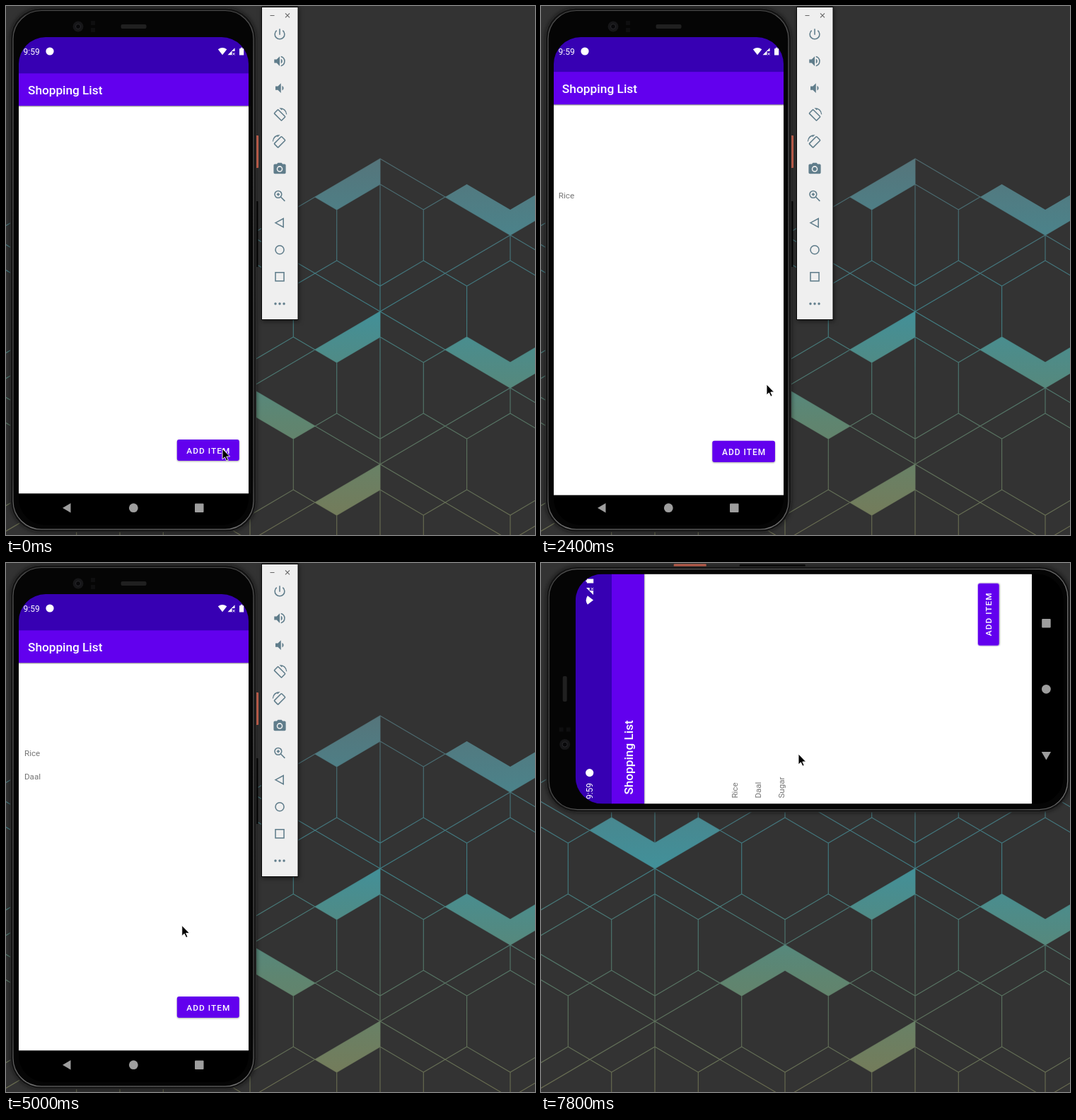
An HTML page for the animation above (8000 ms loop, 748x748 px).

```html
<!DOCTYPE html>
<html lang="en">
<head>
<meta charset="utf-8">
<title>Shopping list</title>
<style>
  html, body { margin: 0; width: 100%; height: 100%; overflow: hidden; background: #333; }
  svg { display: block; width: 100%; height: 100%; }
  text { font-family: Roboto, sans-serif; }
  .title { font-size: 17.2px; font-weight: 500; fill: #fff; }
  .label { font-size: 11.8px; font-weight: 500; letter-spacing: 1.05px; fill: #fff; text-anchor: middle; }
  .entry { font-size: 11.6px; fill: #757575; }
  .button { filter: drop-shadow(0 1px 1px rgba(0, 0, 0, .35)); }
  .press { fill: #fff; opacity: 0; }
  .line { fill: none; stroke: #607d8b; stroke-width: 1.8; }
  .body { filter: drop-shadow(0 0 3px rgba(0, 0, 0, .6)); }
  .panel { filter: drop-shadow(1px 2px 3px rgba(0, 0, 0, .5)); }
</style>
</head>
<body>
<svg viewBox="0 0 748 748">
  <defs>
    <linearGradient id="tint" gradientUnits="userSpaceOnUse" x1="0" y1="216" x2="0" y2="748">
      <stop offset="0" stop-color="#55757b"/>
      <stop offset=".4" stop-color="#429099"/>
      <stop offset=".7" stop-color="#5f8570"/>
      <stop offset="1" stop-color="#787a56"/>
    </linearGradient>
    <linearGradient id="rim" x1="0" y1="0" x2="0" y2="1">
      <stop offset="0" stop-color="#4c4c4c"/>
      <stop offset=".1" stop-color="#5c5c5c"/>
      <stop offset=".9" stop-color="#4a4a4a"/>
      <stop offset="1" stop-color="#777"/>
    </linearGradient>
    <clipPath id="glass"><rect x="18" y="44" width="325" height="690" rx="38"/></clipPath>
    <g id="window">
      <rect x="18" y="44" width="325" height="690" fill="#000"/>
      <rect x="18" y="44" width="325" height="52" fill="#3700b3"/>
      <rect x="18" y="95.3" width="325" height="46" fill="#6200ee"/>
      <rect x="18" y="141.3" width="325" height="548" fill="#fff"/>
      <rect x="18" y="141.3" width="325" height="1.4" fill="#000" opacity=".22"/>
      <text class="title" x="31" y="125">Shopping List</text>
    </g>
  </defs>

  <rect width="748" height="748" fill="#333"/>
  <path id="mesh" fill="none" stroke="url(#tint)" stroke-width="1.1" opacity=".8"/>
  <path id="bands" fill="url(#tint)"/>

  <g id="phone">
    <rect x="353" y="183" width="4" height="46" rx="1" fill="#e2705a"/>
    <rect x="353" y="276" width="3.5" height="93" rx="1" fill="#0a0a0a"/>
    <rect class="body" x="6.500" y="3" width="347" height="740.500" rx="43" fill="#141414" stroke="#303030"/>
    <rect x="10" y="6.500" width="340" height="733.500" rx="40" fill="#050505" stroke="url(#rim)" stroke-width="1.200"/>
    <circle cx="102" cy="29" r="7.500" fill="#161618"/>
    <circle cx="102" cy="29" r="3.500" fill="#08080a" stroke="#29292c"/>
    <path d="M120 21h6v6h-6zM120 31h6v6h-6z" fill="#0e0e0f"/>
    <rect x="162.500" y="26" width="36" height="6" rx="2" fill="#202020"/>
    <g clip-path="url(#glass)">
      <rect x="18" y="44" width="325" height="690" fill="#000"/>
      <g id="main"><use href="#window"/></g>
      <g id="list"><use href="#window"/></g>
    </g>
    <g fill="#fff">
      <text x="24.500" y="68.800" font-size="12">9:59</text>
      <circle cx="62" cy="64" r="5.600"/>
      <path d="M299.800 61.200Q306 56.800 312.300 61.200L306 69.300ZM313.500 69.300L323.500 59.300V64H319.500V69.300ZM330 60.200h1.800v-1.400h2.600v1.400h1.800v9.300h-6.200z"/>
      <path d="M320.500 66l3 3.400m0-3.400l-3 3.400" stroke="#fff" stroke-width=".9"/>
    </g>
    <g fill="#9e9e9e">
      <path d="M80 709.700L91.500 703V716.400Z"/>
      <circle cx="180.300" cy="709.700" r="6.400"/>
      <rect x="267" y="703.500" width="12.500" height="12.500" rx="1"/>
    </g>
  </g>

  <g id="tools">
    <rect class="panel" x="361.500" y="1.500" width="51.500" height="442" fill="#efefef" stroke="#080808"/>
    <path d="M373.500 13.500h6M395 10.300l6 6m0-6l-6 6" stroke="#666" stroke-width="1.100"/>
  </g>

  <path id="cursor" d="M0 0V15L3.400 11.900 5.900 17.200 8.200 16.200 5.800 11H10.600Z" stroke="#fff" stroke-width=".9"/>
</svg>
<script>
const $ = id => document.getElementById(id);
const add = (id, markup) => $(id).insertAdjacentHTML('beforeend', markup);

// Wallpaper: a triangular lattice with a hexagon under each node
const U = 61.33, V = 36;
const trace = (x, y, points, end = '') =>
  'M' + points.map(([i, j]) => `${(x + i * U).toFixed(1)} ${y + j * V}`).join('L') + end;
const half = [[0, 0], [0, 1], [-1, 2], [-1.5, 1.5]];
const roof = [[1.5, 1.5], [1, 2], [0, 1], [-1, 2], [-1.5, 1.5], [0, 0]];
const valley = roof.map(([i, j]) => [i, -j]);
const bandOf = [valley, roof, half, valley];
const firstBand = [432, 540, 216, 324];
let mesh = '', bands = '';
for (let col = -2; col < 5; col++) {
  const odd = col & 1, x = 161 + col * 3 * U;
  for (let y = 216 + odd * 108; y < 800; y += 216) {
    const line = (...points) => { mesh += trace(x, y, points); };
    line([-3, 3], [0, 0], [3, 3]);
    if (odd) line([0, -1], [0, 1]);
    else line([0, 0], [0, 6]);
    mesh += trace(x, y, [[0, 1], [1, 2], [1, 4], [0, 5], [-1, 4], [-1, 2]], 'Z');
    for (const s of [-1, 1]) {
      line([s, 4], [2 * s, 5]);
      line([s, 2], [1.5 * s, 1.5]);
    }
    const single = col < 2;
    if (single ? y === firstBand[col] : y >= firstBand[col] && y < 700 && bandOf[col])
      bands += trace(x, y, bandOf[col], 'Z');
  }
}
$('mesh').setAttribute('d', mesh);
$('bands').setAttribute('d', bands);

// App screens
const button = (id, label, x, y, w) => `
  <g><rect class="button" x="${x}" y="${y}" width="${w}" height="30" rx="3" fill="#6200ee"/>
  <rect class="press" id="${id}" x="${x}" y="${y}" width="${w}" height="30" rx="3"/>
  <text class="label" x="${x + w / 2 + .5}" y="${y + 19.8}">${label}</text></g>`;
const goods = ['Rice', 'Daal', 'Sugar', 'Salt', 'Cooking Oil', 'Onion', 'Banana', 'Apple', 'Cheese', 'Coffee'];
goods.forEach((name, i) => add('list', button(name, name.toUpperCase(), 24.8, 222.2 + i * 39.67, 311)));
add('main', button('Add', 'ADD ITEM', 241.800, 613, 88));

// Emulator toolbar, each icon on a 24-unit grid
const rotate = `<rect class="line" x="7.500" y="3.500" width="9" height="17" rx="1" transform="rotate(-45 12 12)"/>
  <path d="M11.300 0L15.200 3.800 16.500 2.500Q22 5.200 22.500 11H24Q23 0 11.300 0Z"/>`;
const sound = '<path d="M3 9v6h4l5 5V4L7 9zM14 8v8q2.500-1.200 2.500-4T14 8z"/>';
const dot = x => `<circle cx="${x}" cy="12" r="2"/>`;
const icons = [
  '<path class="line" d="M12 3V13M7 5.800A8 8 0 1 0 17 5.800"/>',
  sound + '<path class="line" d="M14 4.300Q20 6 20 12T14 19.700"/>',
  `<g transform="translate(2)">${sound}</g>`,
  rotate,
  `<g transform="matrix(-1 0 0 1 24 0)">${rotate}</g>`,
  '<path d="M9 2L7.200 4H4Q2 4 2 6V18Q2 20 4 20H20Q22 20 22 18V6Q22 4 20 4H16.800L15 2z"/><circle cx="12" cy="12" r="4.100" stroke="#efefef" stroke-width="1.800"/>',
  '<g class="line"><circle cx="9.500" cy="9.500" r="5.700"/><path d="M13.700 13.700L20.500 20.500M7 9.500h5M9.500 7v5"/></g>',
  '<path class="line" d="M5 12L18 5V19Z"/>',
  '<circle class="line" cx="12" cy="12" r="7"/>',
  '<rect class="line" x="5" y="5" width="14" height="14"/>',
  dot(5) + dot(12) + dot(19)
];
icons.forEach((icon, i) =>
  add('tools', `<g fill="#607d8b" transform="translate(376.700 ${29.6 + i * 38.1}) scale(.86)">${icon}</g>`));

// Each visit to the list picks one item; times in ms
const visits = [
  { name: 'Rice', press: 1000, open: 1200, pick: 1800, close: 2000, settle: 3300, overshoot: .086 },
  { name: 'Daal', press: 3300, open: 3400, pick: 3900, close: 4300, settle: 4500, overshoot: .015 },
  { name: 'Sugar', press: 4800, open: 5200, pick: 5600, close: 6000, settle: 6100, overshoot: .012 }
];
visits.forEach(({ name }, i) =>
  add('main', `<text class="entry" id="entry${i}" x="26" y="${273 + i * 33}">${name}</text>`));
const ROTATE = 6700, TOOLS_GONE = 6800, CURSOR_BACK = 7000, LOOP = 8000;

// Cursor stops: arrival, departure, x, y
const ADD = [297, 624];
const stops = [
  [0, 400, 306, 626], [700, 700, 354, 731], [1000, 1300, ...ADD],
  [1800, 1900, 190, 234], [2400, 3200, 319, 535], [3300, 3600, ...ADD],
  [3800, 4000, 210, 276], [4300, 4900, ...ADD], [5400, 5700, 163, 314],
  [6100, 6100, 363, 187], [6500, 7100, 390, 152], [7300, 7400, 384, 161], [7800, LOOP, 364, 270]
];

const zoom = s => `translate(180.5 386) scale(${s}) translate(-180.5 -386)`;
const show = (el, on) => el.setAttribute('visibility', on ? 'visible' : 'hidden');
const easeOut = k => 1 - (1 - k) ** 2;

function cursorAt(t) {
  const i = stops.findLastIndex(s => s[0] <= t);
  const [, leave, x, y] = stops[i];
  if (t <= leave) return `translate(${x} ${y})`;
  const [arrive, , nextX, nextY] = stops[i + 1];
  const k = easeOut((t - leave) / (arrive - leave));
  return `translate(${x + (nextX - x) * k} ${y + (nextY - y) * k})`;
}

// The entering screen settles exponentially; the first opening step is a cross-fade
function viewAt(t) {
  const visit = visits.findLast(v => t >= v.open);
  if (!visit) return { opacity: 0, main: 1, list: 1 };
  const { open, close, settle, overshoot } = visit;
  if (t < close) return {
    opacity: t < open + 100 ? .5 : 1,
    main: 1.053,
    list: 1 - .07 * Math.exp((open - t) / 65)
  };
  const age = Math.min(t - close, 400);
  return { opacity: 0, main: t < settle ? 1 + overshoot * Math.exp(-age / 165) : 1, list: 1 };
}

function render(t) {
  const view = viewAt(t);
  $('main').setAttribute('transform', zoom(view.main));
  $('list').setAttribute('transform', zoom(view.list));
  $('main').style.display = view.opacity < 1 ? '' : 'none';
  $('list').style.opacity = view.opacity;
  visits.forEach((v, i) => {
    show($('entry' + i), t >= v.close);
    $(v.name).style.opacity = t >= v.pick && t < v.pick + 200 ? .22 : 0;
  });
  const adding = visits.some(v => t >= v.press && t < Math.min(v.open, v.press + 200));
  $('Add').style.opacity = adding ? .22 : 0;
  $('phone').setAttribute('transform', t < ROTATE ? '' : 'matrix(0 -1 1 0 4.7 358.6)');
  show($('tools'), t < TOOLS_GONE);
  show($('cursor'), t < TOOLS_GONE || t >= CURSOR_BACK);
  $('cursor').setAttribute('transform', cursorAt(t));
}

const start = performance.now();
function tick() {
  const t = (performance.now() - start) % LOOP;
  render(Math.floor(t / 100) * 100);
  requestAnimationFrame(tick);
}
tick();
</script>
</body>
</html>
```
